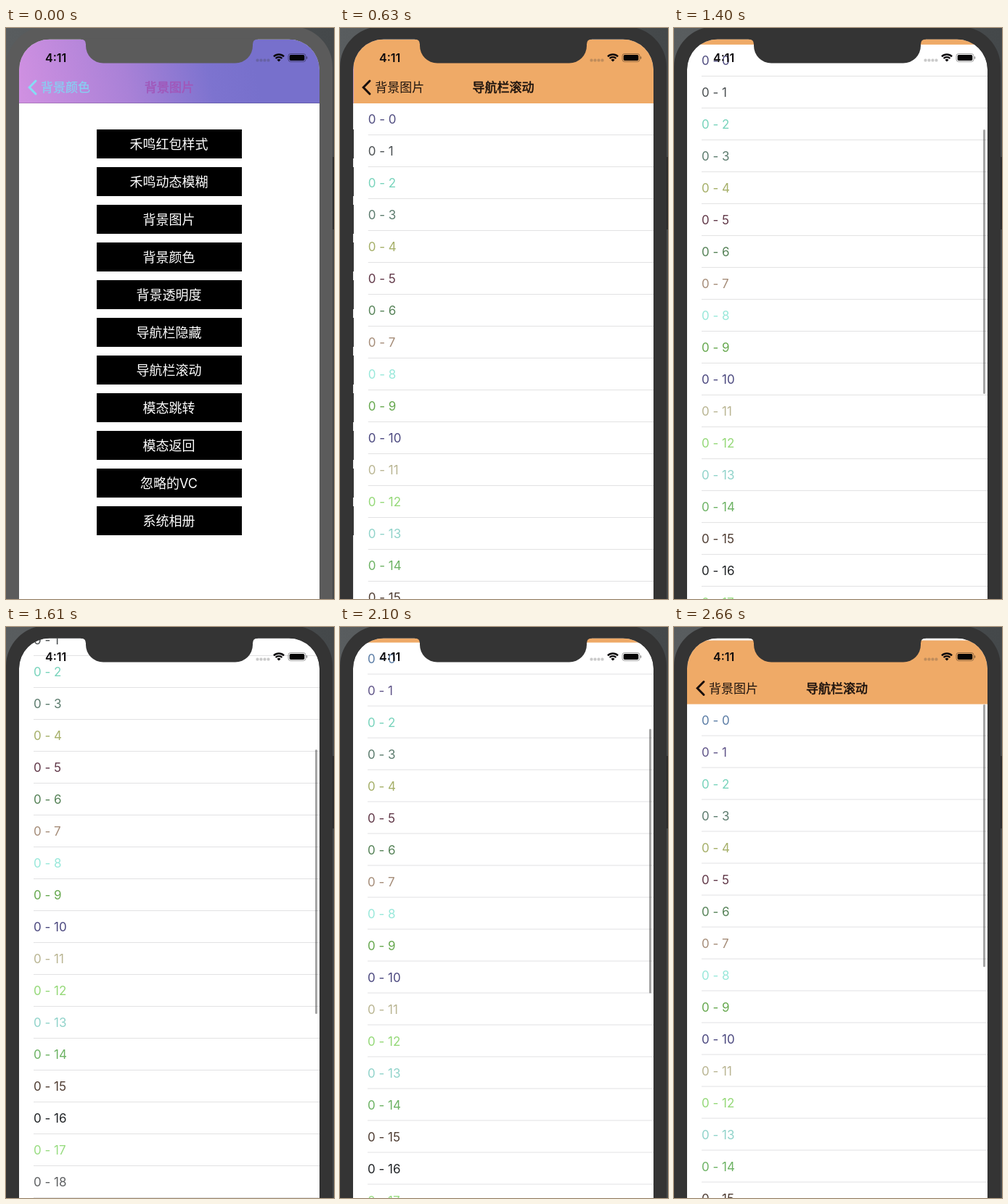
An HTML page with a canvas that plays this animation: 452x788 px, repeating every 2730 ms.

```html
<!DOCTYPE html>
<html lang="zh-CN">
<head>
<meta charset="utf-8">
<style>
  html, body { margin: 0; width: 100%; height: 100%; overflow: hidden; background: #343434; }
  canvas { display: block; }
</style>
</head>
<body>
<canvas id="stage" width="452" height="788"></canvas>
<script>
const ctx = document.getElementById('stage').getContext('2d');
const LOOP = 2730, STEP = 70;
const SCREEN = { x: 18, y: 16, w: 414 };
const BAR_BOTTOM = 104, ROW = 44;
const FONT = 'Inter, "Noto Sans CJK SC", "Noto Sans CJK", sans-serif';
const ORANGE = '#efaa67', INK = '#1d130e';
const PUSH_START = 163, SCROLL_TOP = 1770;

const menu = ['禾鸣红包样式', '禾鸣动态模糊', '背景图片', '背景颜色', '背景透明度',
  '导航栏隐藏', '导航栏滚动', '模态跳转', '模态返回', '忽略的VC', '系统相册'];
const rowColors = ['#504d80', '#4a4f51', '#77d3bb', '#5b7b6d', '#a5af68', '#613848', '#558257',
  '#a58c78', '#98e8da', '#66a84e', '#4b487f', '#b9b592', '#94d877', '#90d3ca', '#6cb263',
  '#4f3d33', '#1f2225', '#98dc80', '#5e6062', '#7f9a88'];
const reusedColors = ['#5a7ca5', '#5f5488'];

// time, content offset
const scrollKeys = [[1050, 0], [1190, 20], [1610, 152], [SCROLL_TOP, 195],
  [2100, 82.5], [2450, 9], [2660, -2.5], [LOOP, -2.5]];

const clamp = v => Math.max(0, Math.min(1, v));
const mix = (a, b, p) => a + (b - a) * p;

// Critically damped spring
function pushProgress(t) {
  const s = Math.max(0, t - PUSH_START) / 1000 * 18.3;
  return t > 700 ? 1 : 1 - (1 + s) * Math.exp(-s);
}

// Monotone cubic interpolation through the scroll keys
function scrollAt(t) {
  const k = scrollKeys;
  if (t <= k[0][0]) return 0;
  const slope = i => i < 0 || i > k.length - 2 ? 0 : (k[i + 1][1] - k[i][1]) / (k[i + 1][0] - k[i][0]);
  const tangent = i => {
    const a = slope(i - 1), b = slope(i);
    return a * b <= 0 ? 0 : 2 * a * b / (a + b);
  };
  let i = 0;
  while (i < k.length - 2 && t >= k[i + 1][0]) i++;
  const h = k[i + 1][0] - k[i][0], u = (t - k[i][0]) / h, u2 = u * u, u3 = u2 * u;
  return (2 * u3 - 3 * u2 + 1) * k[i][1] + (u3 - 2 * u2 + u) * h * tangent(i)
    + (3 * u2 - 2 * u3) * k[i + 1][1] + (u3 - u2) * h * tangent(i + 1);
}

function rect(x, y, w, h, color) {
  ctx.fillStyle = color;
  ctx.fillRect(x, y, w, h);
}

function roundFill(x, y, w, h, r, color) {
  ctx.fillStyle = color;
  ctx.beginPath();
  ctx.roundRect(x, y, w, h, r);
  ctx.fill();
}

// Text vertically centred on y; heavy adds a thin outline for a medium weight
function label(text, x, y, size, color, { align = 'left', weight = 400, alpha = 1, heavy = 0 } = {}) {
  if (alpha <= 0) return;
  ctx.save();
  ctx.globalAlpha *= alpha;
  ctx.font = `${weight} ${size}px ${FONT}`;
  ctx.textAlign = align;
  ctx.fillStyle = ctx.strokeStyle = color;
  ctx.fillText(text, x, y + size * 0.365);
  if (heavy) {
    ctx.lineWidth = heavy;
    ctx.lineJoin = 'round';
    ctx.strokeText(text, x, y + size * 0.365);
  }
  ctx.restore();
}

function drawMenuPage(shift, dim) {
  ctx.save();
  ctx.translate(-shift, 0);
  rect(SCREEN.x, SCREEN.y, SCREEN.w, 780, '#fff');
  const g = ctx.createLinearGradient(22, 90, 335, 20);
  g.addColorStop(0, '#cf90e1');
  g.addColorStop(0.45, '#a981d7');
  g.addColorStop(0.8, '#7d73cf');
  g.addColorStop(1, '#7770cc');
  rect(SCREEN.x, SCREEN.y, SCREEN.w, BAR_BOTTOM - SCREEN.y, g);
  rect(SCREEN.x, BAR_BOTTOM - 0.5, SCREEN.w, 0.5, 'rgba(0,0,0,.3)');
  menu.forEach((text, i) => {
    const y = 140 + 52 * i;
    rect(125, y, 200, 40, '#000');
    label(text, 224.5, y + 20, 18, '#fff', { align: 'center' });
  });
  ctx.restore();
  rect(SCREEN.x, SCREEN.y, SCREEN.w, 780, `rgba(0,0,0,${0.08 * dim})`);
}

function drawTablePage(x, offset, t) {
  ctx.save();
  ctx.translate(x, 0);
  rect(SCREEN.x, SCREEN.y, SCREEN.w, 780, '#fff');
  rowColors.forEach((color, i) => {
    const y = BAR_BOTTOM + ROW * i - offset;
    const reused = t > SCROLL_TOP && reusedColors[i];
    label(`0 - ${i}`, 38, y + 22, 17, reused || color);
    rect(38, y + ROW - 1, SCREEN.w, 1, '#e2e2e3');
  });
  rect(SCREEN.x, SCREEN.y - offset, SCREEN.w, BAR_BOTTOM - SCREEN.y, ORANGE);
  ctx.restore();
}

function drawIndicator(offset, t) {
  const alpha = clamp((t - 1050) / 120);
  if (!alpha) return;
  const squeeze = Math.max(0, -offset);
  const y = 106.8 + 0.409 * Math.max(0, offset);
  roundFill(426, y, 3, 365 - squeeze, 1.5, `rgba(0,0,0,${0.35 * alpha})`);
}

function drawNavItems(p, offset) {
  const y = 82 - offset, rest = 1 - p;
  const start = p < 0.02;
  ctx.strokeStyle = start ? '#86dcf4' : `rgb(${mix(110, 25, p)},${mix(150, 15, p)},${mix(190, 12, p)})`;
  ctx.lineWidth = 3;
  ctx.lineCap = 'round';
  ctx.lineJoin = 'miter';
  ctx.beginPath();
  ctx.moveTo(41, y - 9);
  ctx.lineTo(32.2, y);
  ctx.lineTo(41, y + 9);
  ctx.stroke();

  const titleX = mix(191, 48, p);
  label('背景颜色', 48 - 100 * p, y, 17, '#86d0f2', { alpha: 1 - 2 * p, heavy: 0.25 });
  label('背景图片', titleX, y, 17, '#a058ba', { heavy: 0.6, alpha: 1 - 1.6 * p });
  label('背景图片', titleX, y, 17, INK, { alpha: clamp(1.6 * p - 0.6) });
  label('导航栏滚动', 182 + 260 * rest, y, 17, INK, { heavy: 0.6, alpha: clamp(1.4 * p - 0.4) });
}

function drawStatusBar() {
  label('4:11', 54, 41, 16, '#0c0a0c', { weight: 600 });
  for (let i = 0; i < 4; i++) roundFill(344.5 + 5 * i, 42.5, 4, 4, 1.5, 'rgba(60,60,60,.27)');

  // Wi-Fi fan
  const cx = 376, cy = 46.5, from = -Math.PI * 0.75, to = -Math.PI * 0.25;
  ctx.strokeStyle = ctx.fillStyle = '#0c0a0c';
  ctx.lineWidth = 2.3;
  ctx.lineCap = 'butt';
  for (const r of [6.3, 10]) {
    ctx.beginPath();
    ctx.arc(cx, cy, r, from, to);
    ctx.stroke();
  }
  ctx.beginPath();
  ctx.moveTo(cx, cy);
  ctx.arc(cx, cy, 3.6, from, to);
  ctx.fill();

  ctx.strokeStyle = 'rgba(0,0,0,.38)';
  ctx.lineWidth = 1;
  ctx.beginPath();
  ctx.roundRect(389, 35.5, 24, 11, 3.2);
  ctx.stroke();
  roundFill(390.7, 37, 20.6, 8, 1.8, '#050405');
  roundFill(413.8, 39.2, 1.5, 3.6, 0.7, 'rgba(0,0,0,.4)');
}

function screenPath() {
  ctx.roundRect(SCREEN.x, SCREEN.y - 0.5, SCREEN.w, 900, 42);
}

function drawBackdrop() {
  const g = ctx.createLinearGradient(0, 0, 452, 0);
  g.addColorStop(0, '#595d5f');
  g.addColorStop(1, '#44484a');
  rect(0, 0, 452, 788, g);
}

function drawBezel(color) {
  ctx.fillStyle = color;
  ctx.beginPath();
  ctx.roundRect(0, -2, 450, 950, 56);
  screenPath();
  ctx.fill('evenodd');

  // Notch with flared shoulders
  const l = 110, r = 340, top = SCREEN.y - 0.5, bottom = 48.5;
  ctx.beginPath();
  ctx.moveTo(l - 7, top - 1);
  ctx.lineTo(l - 7, top);
  ctx.quadraticCurveTo(l, top, l, top + 7);
  ctx.arcTo(l, bottom, l + 24, bottom, 24);
  ctx.arcTo(r, bottom, r, top + 7, 24);
  ctx.lineTo(r, top + 7);
  ctx.quadraticCurveTo(r, top, r + 7, top);
  ctx.lineTo(r + 7, top - 1);
  ctx.fill();
  rect(450, 178, 2, 100, '#2b2c2d');
}

function draw(t) {
  const p = pushProgress(t), offset = scrollAt(t);
  drawBackdrop();
  ctx.save();
  ctx.beginPath();
  screenPath();
  ctx.clip();
  rect(0, 0, 452, 788, '#fff');
  if (p < 1) drawMenuPage(0.3 * SCREEN.w * p, p);
  if (p > 0) drawTablePage(SCREEN.w * (1 - p), offset, t);
  drawIndicator(offset, t);
  drawNavItems(p, offset);
  drawStatusBar();
  ctx.restore();
  drawBezel(t < STEP ? '#5b5b5b' : '#343434');
}

function tick() {
  const t = performance.now() % LOOP;
  draw(Math.floor(t / STEP) * STEP);
  requestAnimationFrame(tick);
}
tick();
</script>
</body>
</html>
```
